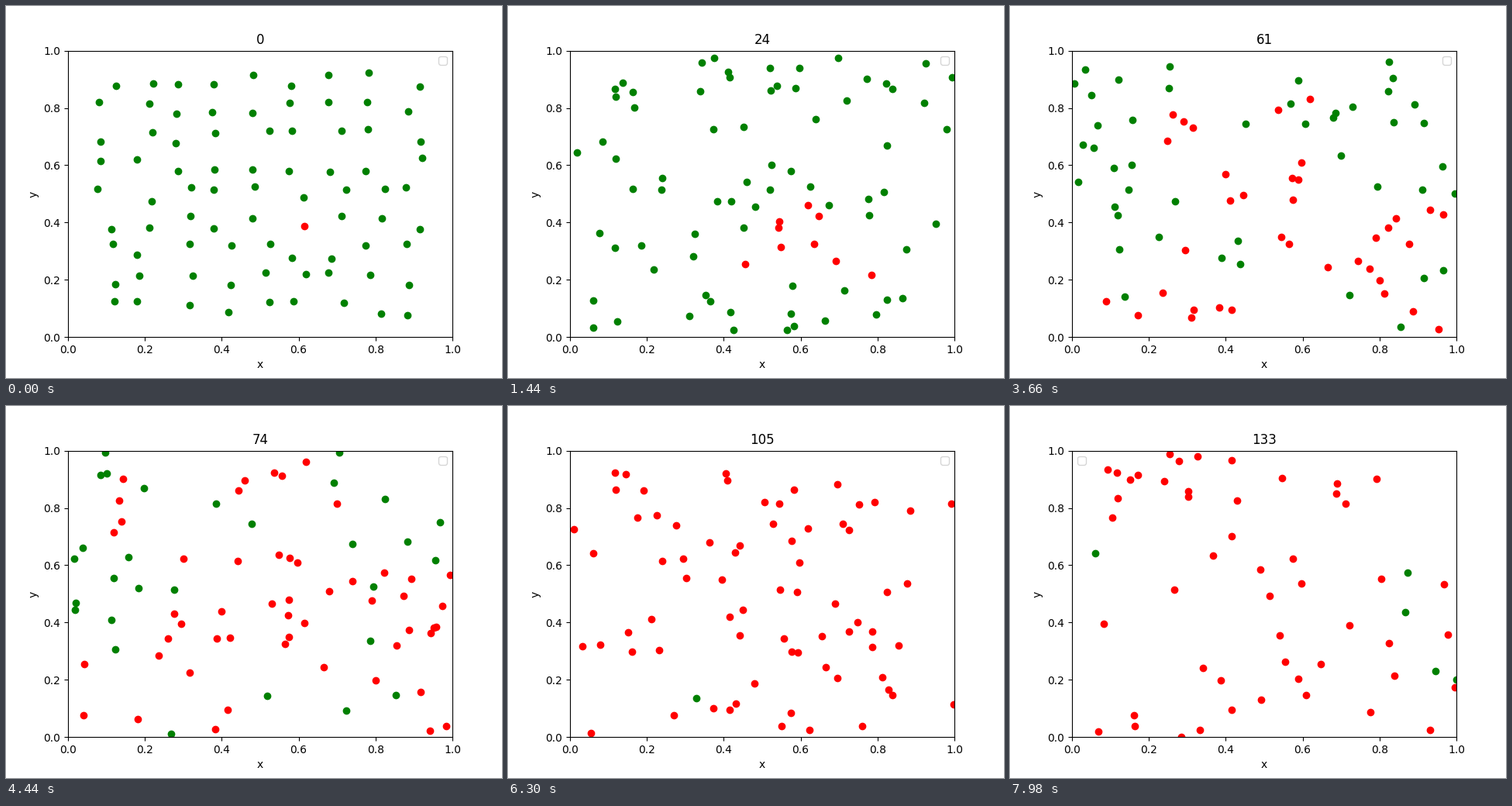
Animation of 640x480 px, one loop 8000 ms. Source, as a matplotlib script:

```python
import numpy as np
import matplotlib.pyplot as plt
from matplotlib.animation import FuncAnimation

SIDE = 9           # dots start on a loose SIDE x SIDE grid
STEPS = 134
HOLD = 3           # 20 ms ticks per simulation step
SPEED = 0.01
REACH = 0.024      # distance at which two dots collide
LEGEND_MOVE = 131  # step at which the legend box changes corner
FIRST_SICK = (5, 3)
HEALTHY, SICK, CURED, DEAD = range(4)


def ever_sick(n):
    return round(np.interp(n, [0, 24, 39, 61, 87, 105, 110],
                           [1, 9, 15, 36, 67, 80, 81]))


def deaths(n):
    return round(np.interp(n, [72, 87, 105, 133], [0, 3, 9, 26]))


def cures(n):
    return round(np.interp(n, [106, 133], [0, 5]))


def distances(a, b):
    return np.hypot(*(a[:, None] - b[None]).transpose(2, 0, 1))


def start(rng):
    """Grid places, each pushed off its node by a small random amount."""
    cells = np.indices((SIDE, SIDE)).reshape(2, -1).T
    push = rng.uniform(0.012, 0.026, cells.shape)
    pos = (cells + 1) / (SIDE + 1) + push * rng.choice([-1, 1], cells.shape)
    first = FIRST_SICK[0] * SIDE + FIRST_SICK[1]
    pos[first] = 0.614, 0.387
    vel = SPEED * rng.integers(-1, 2, pos.shape).astype(float)
    return pos, vel, first


def move(pos, vel, alive):
    """Advance one step, bounce off the walls and swap speeds on contact."""
    pos += vel
    vel[(pos < 0) | (pos > 1)] *= -1
    pos[:] = 1 - np.abs(1 - np.abs(pos))
    near = np.triu(distances(pos, pos) < REACH, 1)
    for a, b in np.argwhere(near):
        closing = np.dot(pos[a] - pos[b], vel[a] - vel[b]) < 0
        if alive[a] and alive[b] and closing:
            vel[[a, b]] = vel[[b, a]]


def nearest_healthy(pos, state):
    well = np.flatnonzero(state == HEALTHY)
    gaps = distances(pos[well], pos[state == SICK])
    return well[gaps.min(axis=1).argmin()]


def simulate():
    pos, vel, first = start(np.random.default_rng(7))
    state = np.full(len(pos), HEALTHY)
    state[first] = SICK
    cases = [first]    # in order of infection
    ended = 0
    history = []
    for n in range(STEPS):
        if n:
            move(pos, vel, state != DEAD)
        while len(cases) < ever_sick(n):
            cases.append(nearest_healthy(pos, state))
            state[cases[-1]] = SICK
        for outcome, count in ((DEAD, deaths(n)), (CURED, cures(n))):
            while np.sum(state == outcome) < count:
                state[cases[ended]] = outcome
                ended += 1
        green = (state == HEALTHY) | (state == CURED)
        history.append((pos[green], pos[state == SICK]))
    return history


history = simulate()

fig, ax = plt.subplots(figsize=(6.4, 4.8), dpi=100)
ax.set(xlim=(0, 1), ylim=(0, 1), xlabel="x", ylabel="y")
title = ax.set_title("0")
green_dots = ax.scatter([], [], color="green")
red_dots = ax.scatter([], [], color="red")
legend = ax.legend([], [], loc="upper right")


def draw(tick):
    n = tick // HOLD
    green, red = history[n]
    green_dots.set_offsets(green)
    red_dots.set_offsets(red)
    title.set_text(str(n))
    legend.set_loc("upper right" if n < LEGEND_MOVE else "upper left")
    return green_dots, red_dots, title, legend


anim = FuncAnimation(fig, draw, frames=STEPS * HOLD - 2, interval=20,
                     repeat=True, repeat_delay=0, init_func=lambda: draw(0))
plt.show()
```
